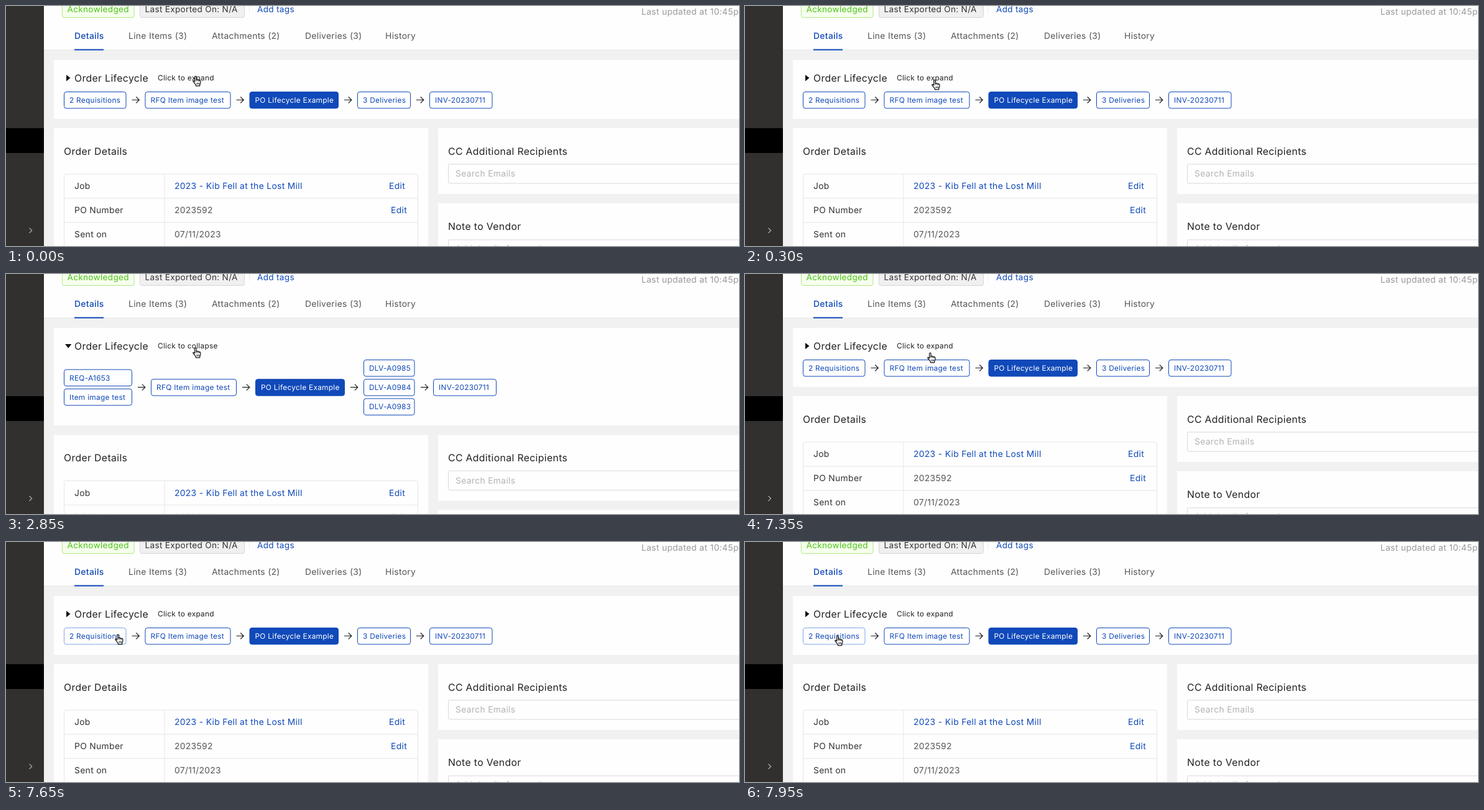
These frames come from a looping animation (1179 by 387 pixels, 8000 ms). An HTML page with a canvas:

```html
<!DOCTYPE html>
<html lang="en">
<head>
<meta charset="utf-8">
<title>Order lifecycle</title>
<style>
html, body { margin: 0; width: 100%; height: 100%; overflow: hidden; background: #f1f1f1; }
canvas { display: block; width: 1179px; height: 387px; }
</style>
</head>
<body>
<canvas id="stage" width="1179" height="387"></canvas>
<script>
const ctx = document.getElementById('stage').getContext('2d');
const LOOP = 8000;
const BLUE = '#1049b9', INK = '#222', GREY = '#555', LINE = '#e6e6e6', PAPER = '#fefefe';
const PITCH = 31.2;

// [start time, left, top] of the pointer
const POINTER = [
  [0, 299, 112], [300, 299, 118], [7350, 292, 126], [7500, 209, 147],
  [7650, 174, 148], [7800, 152, 149], [7950, 143, 150]
];

const HAND = new Path2D('M4.6 10V2.6Q4.6 1 5.8 1Q7 1 7 2.6V7Q8.4 5.8 9.4 7.2' +
  'Q10.8 6.3 11.7 7.9Q13.7 7.2 13.9 9.2V11.4Q13.7 13.4 12.7 15V16.8H6.4V15.2' +
  'Q4.8 13.4 3.1 11.2Q1.4 9 2.1 8.4Q3 7.7 4.6 10Z');

function rect(x, y, w, h, color) {
  ctx.fillStyle = color;
  ctx.fillRect(x, y, w, h);
}

function box(x, y, w, h, r, fill, stroke) {
  ctx.beginPath();
  ctx.roundRect(x + 0.5, y + 0.5, w - 1, h - 1, r);
  ctx.fillStyle = fill;
  ctx.fill();
  ctx.strokeStyle = stroke;
  ctx.lineWidth = 1;
  ctx.stroke();
}

function text(str, x, y, color = GREY, size = 13.9, weight = 400) {
  ctx.font = `${weight} ${size}px Inter, "Open Sans", sans-serif`;
  ctx.letterSpacing = `${size * 0.022}px`;
  ctx.fillStyle = color;
  ctx.fillText(str, x, y);
}

function heading(str, x, y) {
  text(str, x, y, INK, 15.8);
}

function lines(color, width, ...paths) {
  ctx.strokeStyle = color;
  ctx.lineWidth = width;
  ctx.beginPath();
  for (const [first, ...rest] of paths) {
    ctx.moveTo(...first);
    rest.forEach(p => ctx.lineTo(...p));
  }
  ctx.stroke();
}

function triangle(...points) {
  ctx.fillStyle = '#111';
  ctx.beginPath();
  points.forEach(p => ctx.lineTo(...p));
  ctx.fill();
}

function chip(str, x, y, w, { solid = false, border = BLUE } = {}) {
  box(x, y, w, 27.5, 3.5, solid ? BLUE : PAPER, border);
  text(str, x + 9, y + 18, solid ? '#fff' : BLUE, 11.9);
}

function arrow(cx, cy) {
  lines('#222', 1.2,
    [[cx - 6, cy], [cx + 5.5, cy]],
    [[cx + 0.8, cy - 5], [cx + 5.8, cy], [cx + 0.8, cy + 5]]);
}

function drawSidebar() {
  rect(0, 0, 61, 387, '#31302e');
  rect(0, 197, 61, 40, '#000');
  lines('#aaa', 1.2, [[37.5, 358], [41.7, 362], [37.5, 366]]);
}

function drawHeader() {
  rect(61, 0, 1118, 71, PAPER);
  rect(61, 70.5, 1118, 1, LINE);
  box(90, -9, 116.5, 28, 3, '#f6ffed', '#b0e888');
  text('Acknowledged', 98.5, 10, '#4cc417', 13.6);
  box(215, -9, 169, 28, 3, '#f0f0f0', '#d5d5d5');
  text('Last Exported On: N/A', 223.5, 10, '#333', 13.6);
  rect(391, 0, 1, 12, '#ececec');
  text('Add tags', 404, 10, BLUE, 13.6);
  text('Last updated at 10:45pm', 1022, 13.5, '#999');

  text('Details', 110, 53, BLUE, 13.9, 500);
  text('Line Items (3)', 197, 53);
  text('Attachments (2)', 331, 53);
  text('Deliveries (3)', 481, 53);
  text('History', 610, 53);
  rect(110, 69.5, 47, 2, BLUE);
}

function drawLifecycle(open, hover) {
  rect(77, 87, 1102, open ? 157 : 95, PAPER);
  heading('Order Lifecycle', 110, 121.5);
  text(open ? 'Click to collapse' : 'Click to expand', 244, 119.5, INK, 11.9);

  if (open) {
    const mid = 138 + PITCH;
    triangle([95, 113], [105.4, 113], [100.2, 119.5]);
    chip('REQ-A1653', 93, mid - PITCH / 2, 110);
    chip('Item image test', 93, mid + PITCH / 2, 110);
    chip('RFQ Item image test', 233, mid, 138);
    chip('PO Lifecycle Example', 401, mid, 144, { solid: true });
    ['DLV-A0985', 'DLV-A0984', 'DLV-A0983'].forEach((id, i) =>
      chip(id, 575, 138 + i * PITCH, 82.5));
    chip('INV-20230711', 687, mid, 102);
    [218, 386, 560, 673].forEach(x => arrow(x, mid + 13.5));
  } else {
    triangle([97, 111], [103.5, 116], [97, 121.3]);
    chip('2 Requisitions', 93, 138, 100.5, { border: hover ? '#7ca7e8' : BLUE });
    chip('RFQ Item image test', 223.5, 138, 138);
    chip('PO Lifecycle Example', 391.5, 138, 143.5, { solid: true });
    chip('3 Deliveries', 565, 138, 86);
    chip('INV-20230711', 681, 138, 101.5);
    [208.5, 376.5, 550, 666].forEach(x => arrow(x, 151.5));
  }
}

function drawOrder() {
  rect(77, 197, 602, 300, PAPER);
  heading('Order Details', 93, 239.5);
  box(93, 270.5, 570, 200, 2, PAPER, LINE);
  rect(254.5, 270.5, 1, 200, LINE);
  const rows = [
    ['Job', '2023 - Kib Fell at the Lost Mill', 616],
    ['PO Number', '2023592', 619],
    ['Sent on', '07/11/2023', 0]
  ];
  rows.forEach(([label, value, edit], i) => {
    const y = 295.3 + i * 39;
    if (i) rect(93, 270.5 + i * 39, 570, 1, LINE);
    text(label, 110, y, '#333');
    text(value, 271, y, i ? GREY : BLUE);
    if (edit) text('Edit', edit, y, BLUE);
  });
}

function drawVendor() {
  rect(695, 197, 484, 106, PAPER);
  heading('CC Additional Recipients', 711, 239.5);
  box(711, 254.5, 500, 32, 2, PAPER, '#d9d9d9');
  text('Search Emails', 723, 275.3, '#b3b3b3');
  rect(695, 318, 484, 200, PAPER);
  heading('Note to Vendor', 711, 360.5);
  box(711, 376.5, 500, 80, 2, PAPER, '#d9d9d9');
  text('Add details for vendor', 723, 395.5, '#b3b3b3');
}

function drawPointer(x, y) {
  ctx.save();
  ctx.translate(x, y);
  ctx.lineJoin = 'round';
  ctx.fillStyle = '#fff';
  ctx.fill(HAND);
  ctx.strokeStyle = '#111';
  ctx.lineWidth = 1.2;
  ctx.stroke(HAND);
  lines('#111', 0.9,
    [[7, 7], [7, 9.5]], [[9.4, 7.4], [9.4, 9.5]], [[11.7, 8], [11.7, 9.8]],
    [[8, 11.8], [8, 14.6]], [[9.8, 11.8], [9.8, 14.6]], [[11.5, 11.8], [11.5, 14.6]]);
  ctx.restore();
}

function draw(t) {
  const open = t >= 2850 && t < 5400;
  ctx.textRendering = 'geometricPrecision';
  rect(0, 0, 1179, 387, '#f1f1f1');
  drawSidebar();
  drawHeader();
  drawLifecycle(open, t >= 7650);

  ctx.save();
  ctx.translate(0, open ? PITCH * 2 : 0);
  drawOrder();
  drawVendor();
  ctx.restore();

  const [, x, y] = POINTER.findLast(p => p[0] <= t);
  drawPointer(x, y);
}

const start = performance.now();
function tick() {
  draw((performance.now() - start) % LOOP);
  requestAnimationFrame(tick);
}
tick();
</script>
</body>
</html>
```
